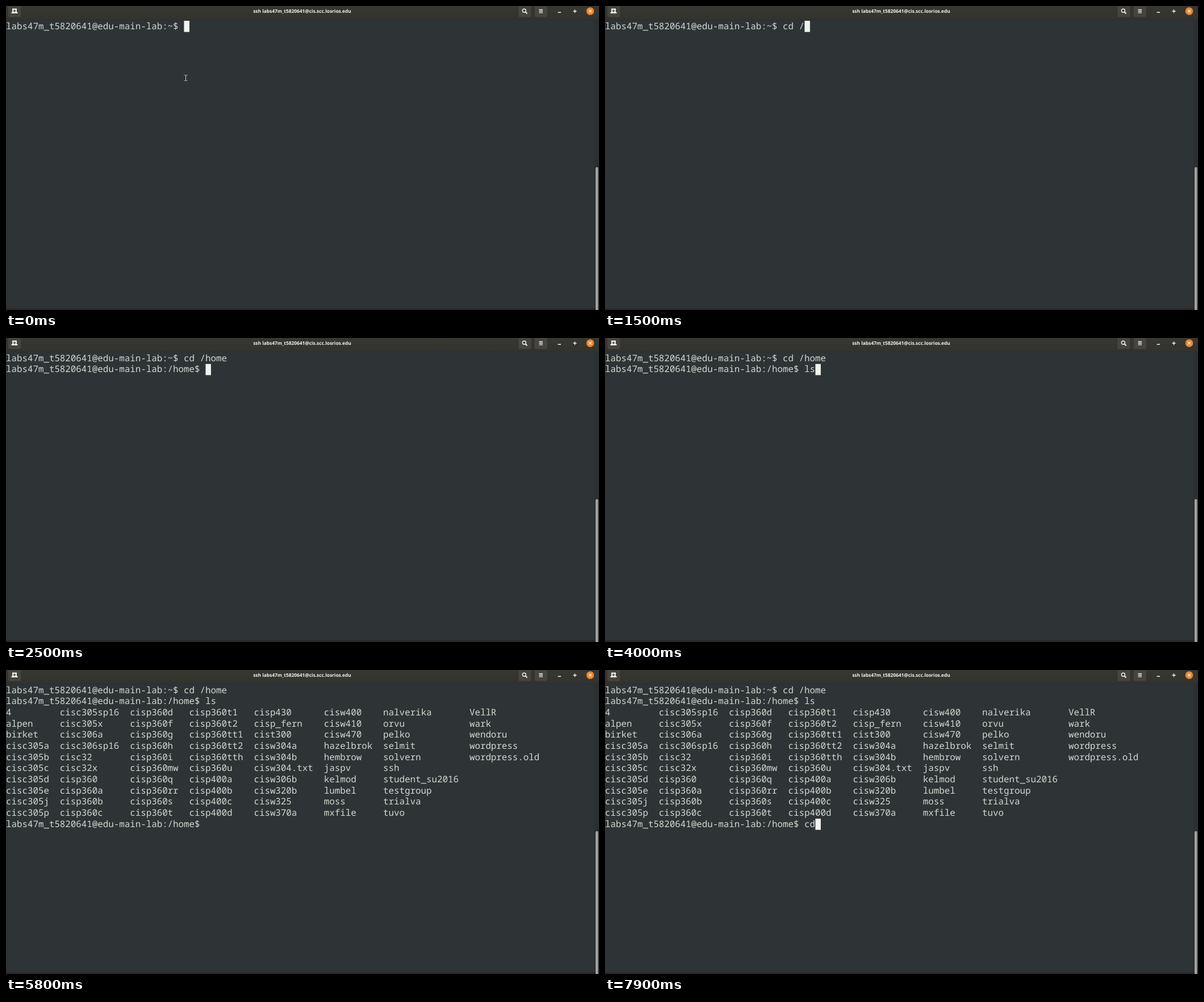
Recreate the animation shown at these times as an HTML page. Size 1044 by 536 pixels, loop 8000 ms.

```html
<!DOCTYPE html>
<html lang="en">
<head>
<meta charset="utf-8">
<title>Terminal</title>
<style>
  html, body { margin: 0; width: 100%; height: 100%; overflow: hidden; background: #2e3436; }
  svg, pre { position: absolute; left: 0; top: 0; text-rendering: geometricPrecision; }
  pre {
    margin: 0; top: 25.5px; color: #d3d7cf;
    font: 15.828px/19.67px "Noto Sans Mono", "DejaVu Sans Mono", monospace;
    font-variant-ligatures: none;
  }
  .title { font: 700 8.36px "Open Sans", "Noto Sans", sans-serif; fill: #f2f2f0; text-anchor: middle; }
</style>
</head>
<body>
<svg width="1044" height="536" viewBox="0 0 1044 536">
  <defs>
    <linearGradient id="bar" x2="0" y2="1">
      <stop stop-color="#383731"/><stop offset="1" stop-color="#32332f"/>
    </linearGradient>
    <path id="beam" d="M313.8 121.8h2l.7.7.7-.7h2M316.5 122.5v8.5M313.8 131.7h2l.7-.7.7.7h2"/>
  </defs>
  <rect width="1044" height="536" fill="#2e3436"/>
  <rect width="1044" height="24" fill="url(#bar)"/>
  <rect y="24" width="1044" height="1" fill="#2b2e2d"/>

  <g fill="#45443e" stroke="#2c2b27" stroke-width=".6">
    <rect x="3.5" y="-4" width="23.5" height="24" rx="3"/>
    <rect x="901.5" y="-4" width="23.5" height="24" rx="3"/>
    <rect x="930" y="-4" width="23.5" height="24" rx="3"/>
  </g>
  <path d="M11 4.5h8v6.5h1.5v2h-11v-2h1.5z" fill="#f2f2f0"/>
  <path d="M15 6v5M12.5 8.5h5" stroke="#45443e" stroke-width="1.3"/>
  <g fill="none" stroke="#f2f2f0" stroke-width="1.4">
    <circle cx="912.3" cy="8.3" r="3"/>
    <path d="M914.5 10.5l3 3" stroke-width="1.8"/>
    <path d="M938.5 6.5h6.5M938.5 9.2h6.5M938.5 11.9h6.5"/>
    <path d="M971.5 11.3h5.5M998.5 9.3h6M1001.5 6.3v6"/>
  </g>
  <circle cx="1028.5" cy="9.1" r="6.8" fill="#ed862c"/>
  <path d="M1026.2 6.8l4.6 4.6m0-4.6l-4.6 4.6" stroke="#fff" stroke-width="1.3"/>
  <text class="title" x="521.5" y="12">ssh labs47m_t5820641@cis.scc.losrios.edu</text>

  <rect x="1036" y="25" width="8" height="508" fill="#2a2f31"/>
  <rect y="533" width="1044" height="3" fill="#2b2529"/>
  <rect x="1038" y="284" width="4.5" height="255" rx="2.2" fill="#a3a4a1"/>

  <rect id="cursor" width="9.497" height="19.67" fill="#f2f2ee"/>
  <g id="pointer" fill="none">
    <use href="#beam" stroke="#15191a" stroke-width="2.4"/>
    <use href="#beam" stroke="#f4f4f4"/>
  </g>
</svg>
<pre id="screen"></pre>

<script>
const LOOP = 8000, CELL_W = 9.497, CELL_H = 19.67, TOP = 26.1;
const host = "labs47m_t5820641@edu-main-lab:";
const homePrompt = host + "/home$ ";

const columns = [
  "4 alpen birket cisc305a cisc305b cisc305c cisc305d cisc305e cisc305j cisc305p",
  "cisc305sp16 cisc305x cisc306a cisc306sp16 cisc32 cisc32x cisp360 cisp360a cisp360b cisp360c",
  "cisp360d cisp360f cisp360g cisp360h cisp360i cisp360mw cisp360q cisp360rr cisp360s cisp360t",
  "cisp360t1 cisp360t2 cisp360tt1 cisp360tt2 cisp360tth cisp360u cisp400a cisp400b cisp400c cisp400d",
  "cisp430 cisp_fern cist300 cisw304a cisw304b cisw304.txt cisw306b cisw320b cisw325 cisw370a",
  "cisw400 cisw410 cisw470 hazelbrok hembrow jaspv kelmod lumbel moss mxfile",
  "nalverika orvu pelko selmit solvern ssh student_su2016 testgroup trialva tuvo",
  "VellR wark wendoru wordpress wordpress.old"
].map(names => names.split(" "));

// Like ls: each column is as wide as its longest name plus two spaces.
const widths = columns.map(names => Math.max(...names.map(name => name.length)) + 2);
const listing = columns[0].map((_, row) =>
  columns.map((names, i) => (names[row] || "").padEnd(widths[i])).join("").trimEnd()
).join("\n");

// [time, text added to the screen, cursor visible]
const steps = [
  [0, host + "~$ ", true],
  [600, "c", true], [800, "d", true], [1000, " ", true],
  [1500, "/", true], [1600, "h", true], [1900, "o", true], [2000, "m", true], [2200, "e", true],
  [2500, "\n" + homePrompt, true],
  [2800, "", false], [3400, "", true],
  [3900, "l", true], [4000, "s", true],
  [4500, "\n" + listing + "\n" + homePrompt, true],
  [4600, "", false], [5200, "", true], [5800, "", false], [6400, "", true], [7000, "", false],
  [7400, "", true], [7500, "c", true], [7900, "d", true]
];

const screenText = document.getElementById("screen");
const cursor = document.getElementById("cursor");
const pointer = document.getElementById("pointer");
let shown = -1;

function draw(time) {
  const done = steps.filter(([at]) => at <= time);
  if (done.length === shown) return;
  shown = done.length;
  const text = done.map(step => step[1]).join("");
  const lines = text.split("\n");
  screenText.textContent = text;
  cursor.setAttribute("x", lines.at(-1).length * CELL_W);
  cursor.setAttribute("y", TOP + (lines.length - 1) * CELL_H);
  cursor.style.display = done.at(-1)[2] ? "" : "none";
  pointer.style.display = time < 600 ? "" : "none";
}

const start = performance.now();
function tick() {
  draw((performance.now() - start) % LOOP);
  requestAnimationFrame(tick);
}
tick();
</script>
</body>
</html>
```
